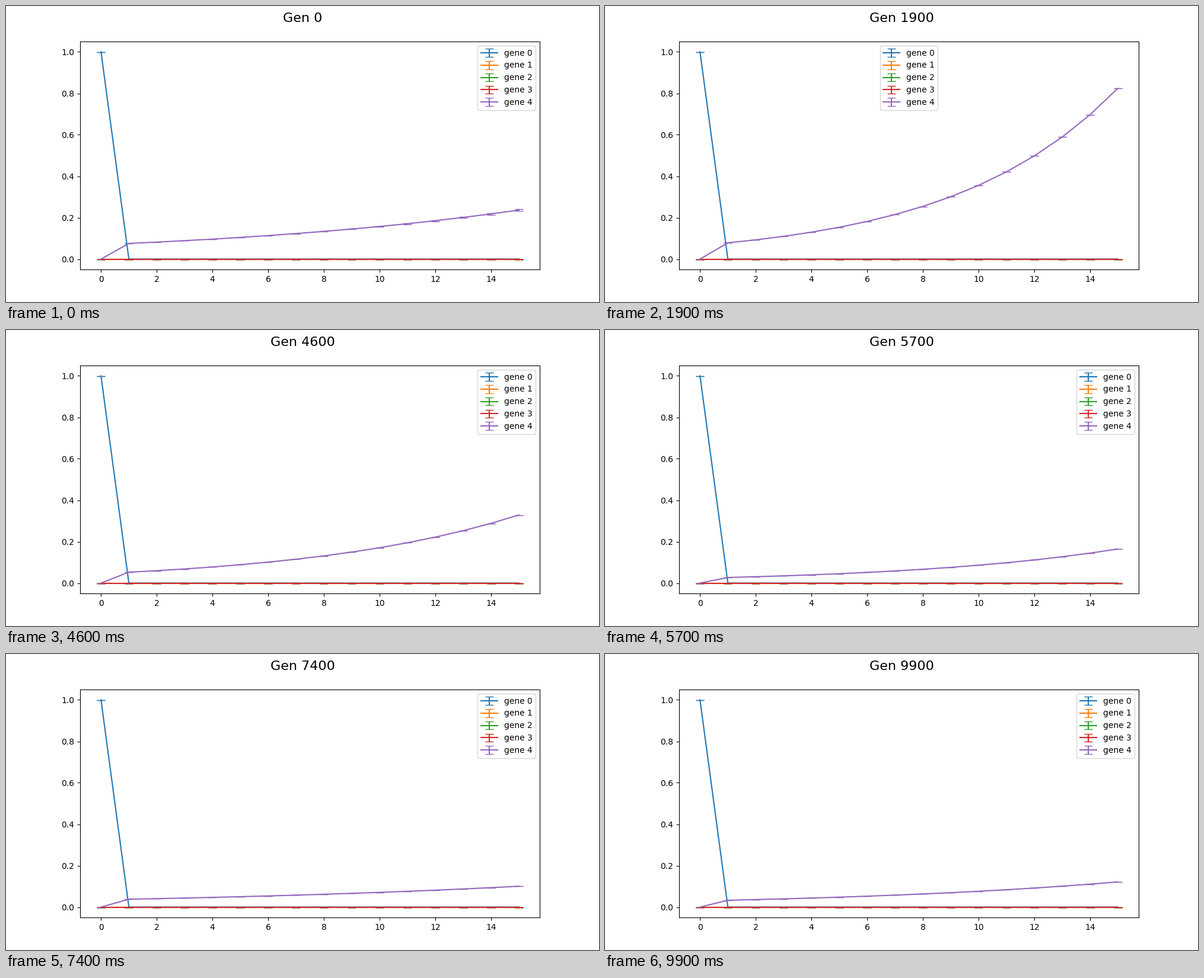
Recreate the animation shown at these times as a matplotlib script. Size 1000 px wide and 500 px high, loop 10000 ms.

```python
import numpy as np
import matplotlib.pyplot as plt
from matplotlib.animation import FuncAnimation

FRAMES, STEP = 100, 100
GENES = 5
x = np.arange(16)
u = (x - 1) / 14

# key moments: generation, level at x=1, level at x=15
KEYS = [(0, .0755, .2365), (1000, .0815, .4865), (1700, .085, 1.06),
        (3100, .0485, .1815), (4600, .0525, .3285), (5700, .027, .1645),
        (7400, .038, .1005), (9900, .033, .1215)]
key_gens, *key_levels = zip(*KEYS)


def pulse(gen, centre, width=250):
    return np.exp(-((gen - centre) / width) ** 2)


def growth(gen):
    """Exponential rise from x=1 to x=15, with a spread that widens as x squared."""
    low, high = (np.exp(np.interp(gen, key_gens, np.log(v))) for v in key_levels)
    y = low * (high / low) ** u
    err = (.017 * pulse(gen, 3100) + .005 * pulse(gen, 0)) * u ** 2
    y[0] = err[0] = 0
    return y, err


fig, ax = plt.subplots(figsize=(10, 5), dpi=100)
title = fig.suptitle("Gen 0", fontsize=16, y=0.978)


def draw(frame):
    gen = frame * STEP
    ax.clear()
    title.set_text(f"Gen {gen}")
    values = np.zeros((GENES, x.size))
    errors = np.zeros_like(values)
    values[0, 0] = 1
    values[-1], errors[-1] = growth(gen)
    for i in range(GENES):
        ax.errorbar(x, values[i], yerr=errors[i], capsize=5, label=f"gene {i}")
    ax.legend(loc="best")
    return []


anim = FuncAnimation(fig, draw, frames=FRAMES, init_func=lambda: draw(0),
                     interval=100, repeat=True, repeat_delay=0)
plt.show()
```
